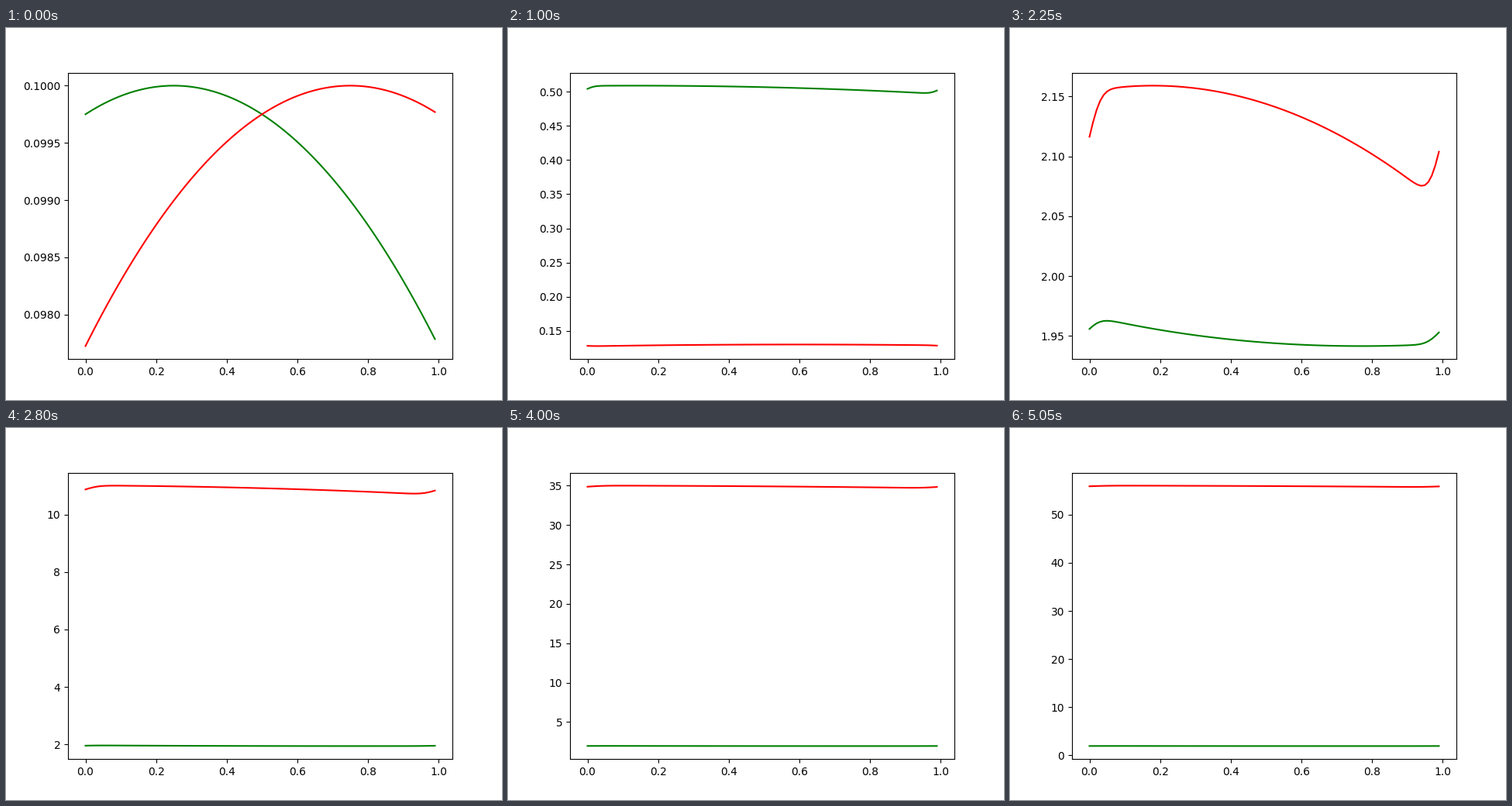
A matplotlib script for the animation above (5100 ms loop, 640 by 480 pixels).

```python
import numpy as np
import matplotlib.pyplot as plt
from matplotlib.animation import FuncAnimation

CELLS = 100
STEPS = 100
DIFFUSION = 0.1
INTERVAL = 50

x = np.arange(CELLS) / CELLS


def hump(center):
    """Shallow elliptic arch peaking at 0.1."""
    return 0.1 * np.sqrt(1 - 0.08 * (x - center) ** 2)


def spread(a):
    """Diffusion on a ring of cells."""
    return DIFFUSION * (np.roll(a, 1) + np.roll(a, -1) - 2 * a)


def growth(rate):
    return np.clip(rate, 0, 1)


def simulate():
    prey, hunter = hump(0.25), hump(0.75)
    states = [(prey, hunter)]
    for _ in range(STEPS):
        d_prey = growth(0.1 * prey * (1 - hunter)) + spread(prey)
        d_hunter = growth(hunter * (0.1 * prey - 0.01)) + spread(hunter)
        prey, hunter = prey + d_prey, hunter + d_hunter
        states.append((prey, hunter))
    return states


states = simulate()

fig, ax = plt.subplots(figsize=(6.4, 4.8), dpi=100)
lines = [ax.plot(x, y, color=c)[0] for y, c in zip(states[0], ("green", "red"))]


def update(i):
    # the starting state is held for two ticks
    for line, y in zip(lines, states[max(i - 1, 0)]):
        line.set_ydata(y)
    ax.relim()
    ax.autoscale_view()
    return lines


anim = FuncAnimation(fig, update, frames=STEPS + 2, init_func=lambda: update(0),
                     interval=INTERVAL, repeat=True, repeat_delay=0, blit=False)
plt.show()
```
